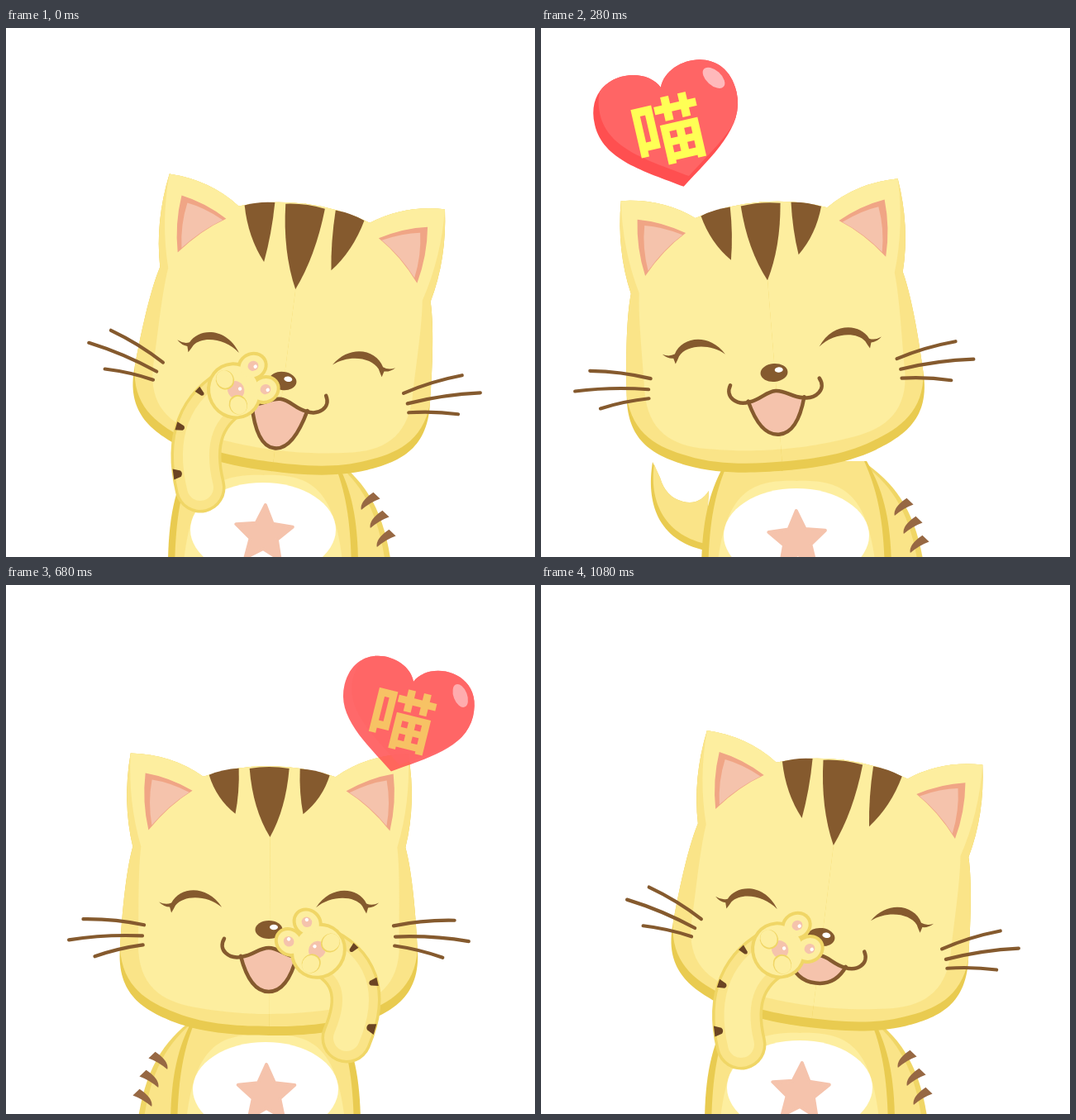
Write an HTML page with a canvas that moves like this. It is 640 px wide and 640 px high and loops after 1120 ms.

```html
<!DOCTYPE html>
<html lang="zh">
<head>
<meta charset="utf-8">
<style>
  html, body { margin: 0; width: 100%; height: 100%; overflow: hidden; background: #fff; }
  canvas { display: block; }
</style>
</head>
<body>
<canvas id="stage" width="640" height="640"></canvas>
<script>
const ctx = document.getElementById('stage').getContext('2d');
const LOOP = 1120, STEP = 40, RAD = Math.PI / 180;
const LIGHT = '#fdee9f', MID = '#fae488', DARK = '#e9cb50', EDGE = '#f0d666';
const BROWN = '#855a2e', PINK = '#f5c3ac', CORAL = '#f0a585';

// time, nose x, nose y, tilt, face shift, whisker lift, mouth opening, belly x, belly top
const pose = [
  [0, 335, 427, 7.3, 0, 15, 60, 311, 550],
  [120, 317, 419, 1.3, 0, 15, 36, 309, 550],
  [280, 282, 417, -4.6, -9, 2.5, 53, 309, 557],
  [400, 275, 446, -8.8, 15, 15, 50, 311, 560],
  [680, 318, 417, 0.2, -18, -4, 53, 314, 553],
  [840, 347, 437, 6, 8, 15, 36, 320, 556],
  [1080, 339, 426, 7.1, 0, 15, 34, 313, 551]
];
const poseLoop = [-LOOP, 0, LOOP].flatMap(d => pose.map(([t, ...v]) => [t + d, ...v]));

// time, shoulder x y, bend x y, hand x y, hand angle, stripe length (negative: inner side)
const leftArm = [
  [840, 240, 550, 212, 622, 300, 606, 100, -26],
  [940, 245, 560, 245, 487, 365, 506, 70, 18],
  [1080, 242, 556, 222, 472, 291, 440, 62, 9],
  [1120, 235, 556, 214, 470, 280, 437, 62, 9],
  [1240, 210, 548, 176, 500, 214, 438, 31, 9],
  [1320, 200, 560, 165, 520, 175, 460, 10, 9]
];
const rightArm = [
  [320, 400, 550, 428, 622, 340, 606, -100, -26],
  [400, 397, 562, 392, 483, 275, 508, -70, 18],
  [680, 412, 548, 446, 468, 375, 440, -47, 9],
  [840, 450, 568, 502, 562, 485, 480, -9, 9],
  [900, 450, 572, 505, 565, 500, 500, 0, 9]
];

// time, notch x, notch y, scale
const leftHeart = [[40, 172, 136, .85], [120, 165, 113, .92], [280, 145, 72, 1], [400, 120, 58, .945]];
const rightHeart = [[600, 488, 140, .85], [680, 493, 117, .91], [840, 497, 73, 1],
  [960, 518, 58, .945], [1000, 521, 50, .93]];

// Smooth curve through unevenly spaced keys
function sample(keys, t) {
  const last = keys.length - 1;
  t = Math.max(keys[0][0], Math.min(keys[last][0], t));
  let i = 0;
  while (i < last - 1 && t >= keys[i + 1][0]) i++;
  const a = keys[i], b = keys[i + 1];
  const p = keys[Math.max(0, i - 1)], n = keys[Math.min(last, i + 2)];
  const h = b[0] - a[0], u = (t - a[0]) / h;
  return a.slice(1).map((va, k) => {
    const vb = b[k + 1];
    const ma = (vb - p[k + 1]) / (b[0] - p[0]) * h;
    const mb = (n[k + 1] - va) / (n[0] - a[0]) * h;
    return va + u * ma + u * u * (3 * (vb - va) - 2 * ma - mb) + u ** 3 * (2 * (va - vb) + ma + mb);
  });
}

function fill(path, color) {
  ctx.fillStyle = color;
  ctx.fill(new Path2D(path));
}

function line(path, color, width) {
  ctx.strokeStyle = color;
  ctx.lineWidth = width;
  ctx.stroke(new Path2D(path));
}

function oval(x, y, rx, ry, color, turn = 0) {
  ctx.fillStyle = color;
  ctx.beginPath();
  ctx.ellipse(x, y, rx, ry, turn * RAD, 0, 7);
  ctx.fill();
}

function at(x, y, turn, draw) {
  ctx.save();
  ctx.translate(x, y);
  ctx.rotate(turn * RAD);
  draw();
  ctx.restore();
}

function flip(side, draw) {
  ctx.save();
  ctx.scale(side, 1);
  draw();
  ctx.restore();
}

const both = draw => [1, -1].forEach(side => flip(side, draw));

function loweredArm() {
  fill('M80,-90 C125,-60 150,-20 157,60 L90,60Z', EDGE);
  fill('M76,-90 C119,-60 143,-20 150,60 L90,60Z', MID);
  for (const [x, y] of [[129, -34], [140, -12], [148, 11]])
    at(x, y, -20, () => fill('M-13,6 Q-12,-4 8,-9 L13,1 Q0,1 -13,6Z', '#976843'));
}

function hiddenArm() {
  fill('M174,-89 C182,-40 168,6 110,18 L106,-54 Q118,-36 137,-41 Q158,-46 165,-70Z', DARK);
  fill('M172,-86 C178,-44 162,-2 110,10 L106,-54 Q118,-36 137,-41 Q158,-46 165,-70Z', MID);
}

function star() {
  ctx.beginPath();
  for (let i = 0; i < 10; i++) {
    const r = i % 2 ? 17 : 36, a = i * 36 * RAD;
    ctx.lineTo(r * Math.sin(a), -r * Math.cos(a));
  }
  ctx.closePath();
  ctx.fillStyle = ctx.strokeStyle = PINK;
  ctx.lineWidth = 4;
  ctx.fill();
  ctx.stroke();
}

function torso(tilt) {
  both(() => {
    fill('M-1,-90 L85,-90 C108,-50 116,-10 115,60 L-1,60Z', DARK);
    fill('M-1,-90 L82,-90 C100,-50 107,-10 107,60 L-1,60Z', MID);
    fill('M-1,-66 C60,-68 90,-50 98,60 L-1,60Z', LIGHT);
  });
  oval(0, 0, 88, 57, '#fff');
  at(1, 6, tilt * .4, star);
}

function ear() {
  fill('M150,-207 Q121,-202 93,-186 Q122,-168 146,-138 Q154,-172 150,-207Z', CORAL);
  fill('M142,-199 Q121,-196 97,-184 Q122,-168 142,-144 Q147,-172 142,-199Z', PINK);
}

function skull() {
  const top = 'M-1,-216 Q42,-216 80,-203 Q118,-230 168,-231 ';
  const side = 'Q178,-172 165,-118 C174,-85 178,-30 180,5 ';
  both(() => {
    fill(top + side + 'C184,62 150,80 115,94 C75,109 30,110 -1,110Z', DARK);
    fill(top + side + 'C177,52 147,70 112,83 C75,98 30,99 -1,99Z', MID);
    fill(top + 'Q171,-172 155,-118 C159,-85 157,-30 158,0 C158,50 130,69 90,76 C50,83 20,84 -1,84Z', LIGHT);
    ear();
  });
}

function forehead(shift) {
  const mid = shift / 2, low = -112 + shift, tip = -140 + shift;
  fill(`M-24,-213 Q0,-217 24,-213 Q20,${-155 + mid} 1,${low} Q-20,${-155 + mid} -24,-213Z`, BROWN);
  both(() => fill(`M37,-213 Q56,-212 73,-205 Q64,${-167 + mid} 41,${tip} Q36,${-175 + mid} 37,-213Z`, BROWN));
}

function face(lift, open) {
  const low = 22 + open;
  both(() => {
    fill('M-133,-33 Q-125,-29 -118,-32 C-108,-52 -75,-55 -57,-27 C-75,-42 -103,-42 -113,-29 ' +
      'Q-115,-25 -118,-20 L-120,-27 Q-127,-27 -133,-33Z', BROWN);
    at(-153, 8, lift, () =>
      line('M3,-13 Q-32,-23 -70,-25 M0,0 Q-45,-5 -89,-1 M0,11 Q-30,13 -59,21', BROWN, 4.2));
  });
  const jaw = `M-34,32 C-27,${32 + open * .5} -16,${low} 0,${low} C16,${low} 27,${32 + open * .5} 34,32`;
  fill(jaw + ' C18,31 12,22 0,22 C-12,22 -18,31 -34,32Z', PINK);
  line(jaw, BROWN, 4.5);
  line('M-54,11 C-62,25 -48,36 -33,33 C-18,31 -12,22 0,22 C12,22 18,31 33,33 C48,36 62,25 54,11', BROWN, 4.5);
  oval(0, 0, 16.5, 11, BROWN);
  oval(6, -3, 5, 3.2, '#fff');
}

function openPaw() {
  for (const grow of [4, 0]) {
    const color = grow ? EDGE : LIGHT;
    oval(0, 4, 31 + grow, 29 + grow, color);
    both(() => oval(16, -29, 13 + grow, 15 + grow, color));
  }
  oval(0, 2, 11, 10, PINK);
  both(() => {
    oval(16, -30, 6, 6.5, PINK);
    oval(17, 8, 12, 11, EDGE);
    oval(18, 8, 11, 10, LIGHT);
  });
  [[-14, -32], [18, -32], [1, -3]].forEach(([x, y]) => oval(x, y, 2.2, 2.2, '#fff'));
}

function raisedArm(keys, t, side, pads) {
  const [sx, sy, cx, cy, hx, hy, angle, stripe] = sample(keys, t);
  const curve = `M${sx},${sy} Q${cx},${cy} ${hx},${hy}`;
  line(curve, EDGE, 61);
  if (!pads) oval(hx, hy, 33, 32, EDGE);
  line(curve, MID, 54);
  if (!pads) oval(hx, hy, 29, 28, LIGHT);
  line(curve, LIGHT, 32);

  const out = side * Math.sign(stripe), size = Math.abs(stripe);
  for (const u of [.12, .45, .75]) {
    const v = 1 - u;
    const x = v * v * sx + 2 * u * v * cx + u * u * hx;
    const y = v * v * sy + 2 * u * v * cy + u * u * hy;
    const dx = v * (cx - sx) + u * (hx - cx), dy = v * (cy - sy) + u * (hy - cy);
    const turn = Math.atan2(-dx * out, dy * out) / RAD;
    const w = (5 + size * .15) * (size < 12 ? 1.1 - u * .6 : 1);
    at(x, y, turn, () => fill(`M29,${-w} L${29 - size},${-w * .6} Q${26 - size},0 ${29 - size},${w * .5} L29,${w}Z`,
      size < 12 ? '#6b4423' : BROWN));
  }
  if (pads) at(hx, hy, angle, openPaw);
}

function heart(keys, t, turn) {
  const start = keys[0][0], end = keys[keys.length - 1][0];
  if (t < start || t > end) return;
  const [x, y, scale] = sample(keys, t);
  const shape = 'M0,0 C14,-34 88,-36 88,26 C88,70 42,94 0,123 C-42,94 -88,70 -88,26 C-88,-36 -14,-34 0,0Z';
  at(x, y, turn, () => {
    ctx.scale(scale, scale);
    ctx.globalAlpha = Math.min(1, (t - start) / 94);
    fill(shape, '#ff4f50');
    ctx.save();
    ctx.clip(new Path2D(shape));
    ctx.translate(9, -11);
    fill(shape, '#ff6565');
    ctx.restore();
    oval(65, 3, 16, 9, '#ffb9bb', 55);
    ctx.fillStyle = scale > .97 ? '#ffff55' : '#f6d264';
    ctx.font = '900 88px "Noto Sans CJK SC", "Noto Sans CJK", sans-serif';
    ctx.textAlign = 'center';
    ctx.textBaseline = 'middle';
    ctx.fillText('喵', -3, 52);
  });
}

function render(t) {
  const [nx, ny, tilt, shift, lift, open, bx, top] = sample(poseLoop, t);
  const lt = t < 340 ? t + LOOP : t;
  const arms = [
    { keys: leftArm, t: lt, side: 1, from: 800, front: 890, pads: 1000, hide: 1320, end: 1460 },
    { keys: rightArm, t, side: -1, from: 300, front: 360, pads: 500, hide: 900, end: 980 }
  ];
  const drawArm = a => raisedArm(a.keys, a.t, a.side, a.t >= a.pads);

  ctx.clearRect(0, 0, 640, 640);
  ctx.lineCap = ctx.lineJoin = 'round';

  at(bx, top + 57, 0, () => {
    for (const a of arms) {
      if (a.t < a.from || a.t >= a.end) flip(-a.side, loweredArm);
      else if (a.t >= a.hide) flip(-a.side, hiddenArm);
    }
    torso(tilt);
  });
  arms.filter(a => a.t >= a.from && a.t < a.front).forEach(drawArm);

  at(nx, ny, tilt, () => {
    ctx.translate(0, -shift);
    skull();
    forehead(shift);
    ctx.translate(0, shift);
    face(lift, open);
  });
  arms.filter(a => a.t >= a.front && a.t < a.hide).forEach(drawArm);

  heart(leftHeart, t, -13);
  heart(rightHeart, t, 14);
}

function tick() {
  render(Math.floor(performance.now() % LOOP / STEP) * STEP);
  requestAnimationFrame(tick);
}
tick();
</script>
</body>
</html>
```
